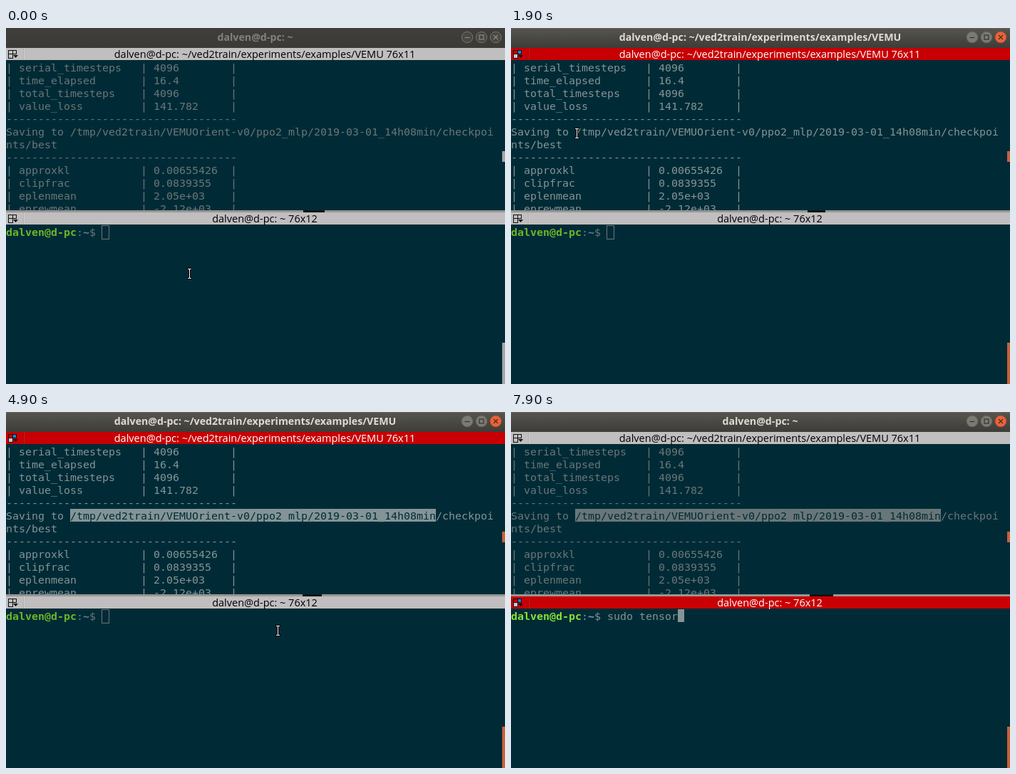
These frames come from a looping animation (700 px wide and 500 px high, 8000 ms). An HTML page with a canvas:

```html
<!DOCTYPE html>
<html lang="en">
<head>
<meta charset="utf-8">
<title>Terminal session</title>
<style>
html, body { margin: 0; width: 100%; height: 100%; overflow: hidden; background: #002b36; }
canvas { display: block; width: 700px; height: 500px; }
</style>
</head>
<body>
<canvas id="stage" width="700" height="500"></canvas>
<script>
const ctx = document.getElementById('stage').getContext('2d');
const LOOP = 8000, STEP = 100;
const CELL = 9, ROW = 18, BASE = 15;
const MONO = '14.95px "DejaVu Sans Mono", monospace';
const SANS = '"Open Sans", "Noto Sans", sans-serif';
const USER = 'dalven@d-pc';
const PATH = USER + ': ~/ved2train/experiments/examples/VEMU';
const BG = '#002b36';
const BRIGHT = { text: '#839496', green: '#8ae234', blue: '#729fcf' };
const DIM = { text: '#697678', green: '#6eb52a', blue: '#5b7fa6' };

const entry = (name, value) => '| ' + name.padEnd(19) + '| ' + value.padEnd(12) + '|';
const rule = '-'.repeat(36);
const LOG = [
  entry('serial_timesteps', '4096'),
  entry('time_elapsed', '16.4'),
  entry('total_timesteps', '4096'),
  entry('value_loss', '141.782'),
  rule,
  'Saving to /tmp/ved2train/VEMUOrient-v0/ppo2_mlp/2019-03-01_14h08min/checkpoi',
  'nts/best',
  rule,
  entry('approxkl', '0.00655426'),
  entry('clipfrac', '0.0839355'),
  entry('eplenmean', '2.05e+03'),
  entry('eprewmean', '-2.12e+03')
];
const LOG_TOP = 46, PROMPT_TOP = 277, SEL_ROW = 5, SEL_COL = 10;

// Event times in ms
const FOCUS = 600, PICK_LOG = 1900, DRAG = 2000, DROP = 3200;
const SCROLL = 3900, PICK_PROMPT = 5300, HIDE_MOUSE = 5900;
const COMMAND = 'sudo tensor';
const KEYS = [6000, 6200, 6300, 6500, 6700, 6900, 7000, 7200, 7300, 7500, 7800];

// Pointer path: time, x, y
const POINTER = [
  [0, 257, 345], [300, 240, 346], [700, 240, 346], [1300, 100, 152],
  [1600, 92, 148], [2000, 92, 148], [2200, 330, 150], [2400, 513, 152],
  [2500, 482, 151], [2700, 600, 158], [2900, 606, 157], [3100, 604, 151],
  [3200, 598, 151], [3700, 598, 152], [4000, 612, 217], [4500, 470, 352],
  [4900, 381, 307]
];

function pointerAt(t) {
  const i = POINTER.findIndex(p => p[0] > t);
  if (i < 0) return POINTER[POINTER.length - 1].slice(1);
  const [t0, x0, y0] = POINTER[i - 1], [t1, x1, y1] = POINTER[i];
  const k = (t - t0) / (t1 - t0);
  return [Math.round(x0 + (x1 - x0) * k), Math.round(y0 + (y1 - y0) * k)];
}

function rect(x, y, w, h, color) {
  ctx.fillStyle = color;
  ctx.fillRect(x, y, w, h);
}

function label(str, x, y, font, color) {
  ctx.font = font;
  ctx.textAlign = 'center';
  ctx.fillStyle = color;
  ctx.fillText(str, x, y);
}

// Writes on the terminal's character grid
function cells(str, col, top, color, bold) {
  ctx.font = (bold ? 'bold ' : '') + MONO;
  ctx.textAlign = 'left';
  ctx.fillStyle = color;
  [...str].forEach((c, i) => ctx.fillText(c, (col + i) * CELL, top + BASE));
}

function line(x0, y0, x1, y1) {
  ctx.beginPath();
  ctx.moveTo(x0, y0);
  ctx.lineTo(x1, y1);
  ctx.stroke();
}

function windowBar(title, active) {
  const g = ctx.createLinearGradient(0, 0, 0, 28);
  g.addColorStop(0, active ? '#565550' : '#3f3e3a');
  g.addColorStop(1, active ? '#3d3c38' : '#3b3a36');
  rect(0, 0, 700, 28, g);
  if (active) rect(0, 0, 700, 1, '#65645e');
  label(title, 349.5, 18, 'bold 14.2px ' + SANS, active ? '#dfdbd2' : '#85827b');
  [647, 667, 687].forEach((x, i) => {
    const close = active && i === 2;
    ctx.beginPath();
    ctx.arc(x, 13, 7.7, 0, Math.PI * 2);
    ctx.fillStyle = close ? '#ee6237' : active ? '#7b7a73' : '#494843';
    ctx.fill();
    ctx.lineWidth = 1;
    ctx.strokeStyle = close ? '#c9532f' : active ? '#6a6962' : '#77756e';
    ctx.stroke();
    ctx.strokeStyle = active ? '#35332f' : '#8c8a83';
    ctx.lineWidth = 1.2;
    if (i === 0) line(x - 3.5, 13.5, x + 3.5, 13.5);
    if (i === 1) ctx.strokeRect(x - 3, 10, 6, 6);
    if (i === 2) {
      line(x - 3, 10, x + 3, 16);
      line(x + 3, 10, x - 3, 16);
    }
  });
}

function paneBar(y, title, active) {
  const back = active ? '#c80003' : '#c0bebf';
  const tile = active ? '#c8c6c6' : back;
  rect(0, y, 700, 17, back);
  rect(3, y + 3, 12, 12, '#111');
  rect(4, y + 4, 5, 4, active ? back : tile);
  rect(10, y + 4, 4, 4, active ? '#1687dc' : tile);
  rect(4, y + 9, 5, 5, tile);
  rect(10, y + 9, 7, 6, back);
  ctx.fillStyle = '#111';
  ctx.beginPath();
  ctx.moveTo(10, y + 10);
  ctx.lineTo(17, y + 10);
  ctx.lineTo(13.5, y + 14);
  ctx.fill();
  rect(24, y, 1, 17, active ? '#b00003' : '#b0aeae');
  rect(25, y, 1, 17, active ? '#d01a1c' : '#d0cece');
  label(title, 363, y + 14, '14.5px ' + SANS, active ? '#fff' : '#000');
}

function logPane(t, pal) {
  ctx.save();
  ctx.beginPath();
  ctx.rect(0, 45, 700, 211);
  ctx.clip();
  LOG.forEach((str, i) => cells(str, 0, LOG_TOP + i * ROW, pal.text));
  if (t >= DRAG) {
    // The selection trails the pointer by one step
    const [x, y] = pointerAt(Math.min(t, DROP) - STEP);
    const endRow = Math.floor((y - LOG_TOP) / ROW);
    const endCol = Math.floor(x / CELL);
    for (let r = SEL_ROW; r <= endRow; r++) {
      const from = r === SEL_ROW ? SEL_COL : 0;
      const to = r === endRow ? endCol : 76;
      const top = LOG_TOP + r * ROW;
      rect(from * CELL, top, (to - from) * CELL, ROW, pal.text);
      cells(LOG[r].slice(from, to), from, top, BG);
    }
  }
  ctx.restore();
}

function promptPane(t, pal, active) {
  cells(USER, 0, PROMPT_TOP, pal.green, true);
  cells(':', 11, PROMPT_TOP, pal.text);
  cells('~', 12, PROMPT_TOP, pal.blue, true);
  cells('$', 13, PROMPT_TOP, pal.text);
  const typed = COMMAND.slice(0, KEYS.filter(k => k <= t).length);
  cells(typed, 15, PROMPT_TOP, pal.text);
  const x = (15 + typed.length) * CELL;
  if (!active) {
    ctx.lineWidth = 1;
    ctx.strokeStyle = pal.text;
    ctx.strokeRect(x - 0.5, PROMPT_TOP + 0.5, 10, 19);
  } else if (t >= PICK_PROMPT || (t - FOCUS) % 1200 < 600) {
    rect(x, PROMPT_TOP, CELL, ROW, pal.text);
  }
}

// Thin gap between the panes, with a dark shape moving behind it
function gap(t) {
  rect(0, 256, 700, 3, '#979795');
  const x = 417 + 6 * Math.sin(t / 310);
  const w = 30 + 5 * Math.sin(t / 170);
  rect(Math.round(x), 256, Math.round(w), 3, '#101414');
}

function beam(x, y) {
  const shape = pad => {
    ctx.fillRect(x - pad, y - 7 - pad, 1 + pad * 2, 14 + pad * 2);
    ctx.fillRect(x - 2 - pad, y - 7 - pad, 5 + pad * 2, 1 + pad * 2);
    ctx.fillRect(x - 2 - pad, y + 6 - pad, 5 + pad * 2, 1 + pad * 2);
  };
  ctx.fillStyle = '#000';
  shape(1);
  ctx.fillStyle = '#fff';
  shape(0);
}

function draw(t) {
  const active = t >= FOCUS;
  const onLog = t >= PICK_LOG && t < PICK_PROMPT;
  const onPrompt = active && !onLog;
  rect(0, 0, 700, 500, BG);
  windowBar(onLog ? PATH : USER + ': ~', active);
  logPane(t, onLog ? BRIGHT : DIM);
  gap(t);
  paneBar(28, PATH + ' 76x11', onLog);
  paneBar(259, USER + ': ~ 76x12', onPrompt);
  promptPane(t, onPrompt ? BRIGHT : DIM, onPrompt);
  const thumb = active ? '#c8613a' : '#a3a5a4';
  rect(696, t >= SCROLL ? 168 : 173, 4, 15, thumb);
  rect(696, 442, 4, 58, thumb);
  if (t < HIDE_MOUSE) beam(...pointerAt(t));
}

const start = performance.now();
function tick() {
  const t = (performance.now() - start) % LOOP;
  draw(Math.floor(t / STEP) * STEP);
  requestAnimationFrame(tick);
}
tick();
</script>
</body>
</html>
```
